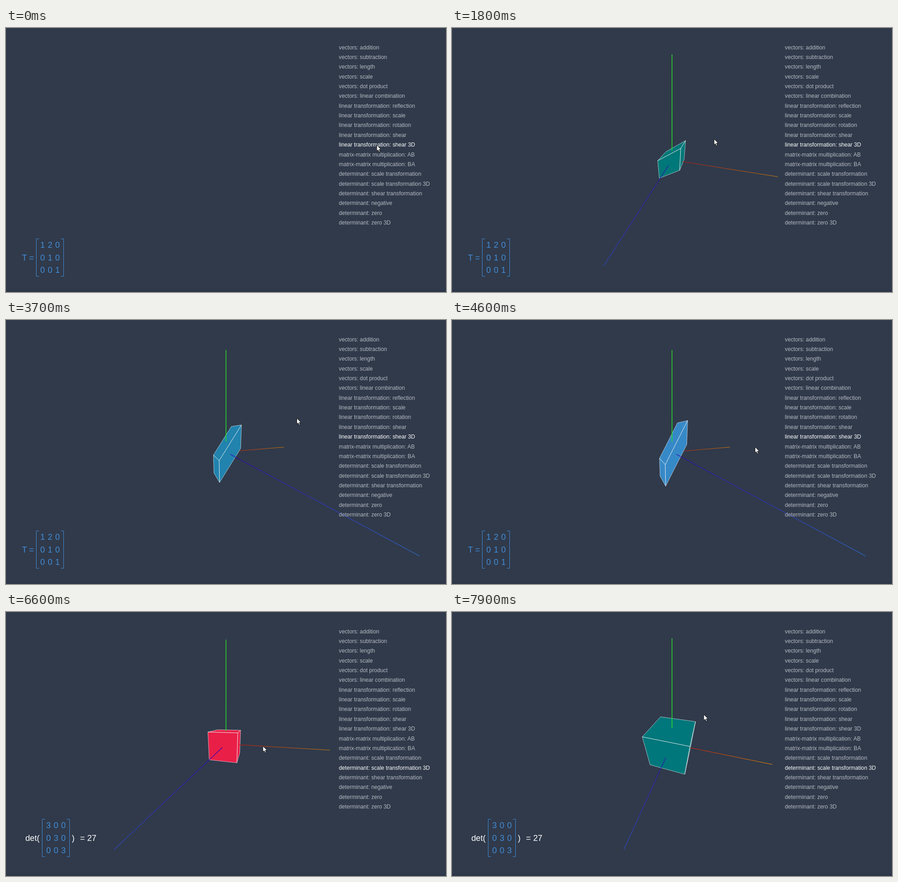
Write an HTML page with a canvas that moves like this. It is 966 by 579 pixels and loops after 8 s.

```html
<!DOCTYPE html>
<html lang="en">
<head>
<meta charset="utf-8">
<title>Linear transformations</title>
<style>
  html, body { margin: 0; width: 100%; height: 100%; overflow: hidden; background: #303a4b; }
  canvas { position: absolute; left: 58px; top: 58px; }
  svg { position: absolute; left: 0; top: 0; font-family: "Liberation Sans", Arial, sans-serif; }
  #menu { font-size: 12.2px; }
  .matrix { font-size: 18.2px; fill: #428cd6; }
  .matrix path { fill: none; stroke: #428cd6; }
  .matrix .plain { fill: #fff; }
  #arrow, #hand { fill: #fff; stroke: #111; stroke-width: 1; stroke-linejoin: round; }
</style>
</head>
<body>
<canvas id="scene" width="850" height="463"></canvas>
<svg width="966" height="579" viewBox="0 0 966 579">
  <rect y="574" width="966" height="5" fill="#2d3749"/>
  <g id="menu"></g>
  <g id="shear" class="matrix"><text x="35" y="510">T =</text></g>
  <g id="det" class="matrix">
    <text class="plain" x="42.5" y="502">det(</text>
    <text class="plain" x="144.5" y="502">)</text>
    <text class="plain" x="162.5" y="502">= 27</text>
  </g>
  <path id="arrow" d="M0 0V13L3 10.3L5 15L7.2 14L5.2 9.5H9.3Z"/>
  <path id="hand" d="M0 0Q1.5-1 2.5 .5V5L7.5 6.2Q9.2 6.8 9 8.6L8.6 13H1.5L-3.2 7.6Q-3.2 5.8-1.4 6.5L0 7.6Z"/>
</svg>
<script>
const LOOP = 8000, STEP = 100, SWITCH = 6000, TWEEN = 5130;
const FOCAL = 194.3, DIST = Math.hypot(4, 4, 16), AXIS = 16, HALF = 2;
const TURN = 2 * Math.PI / 579;
const SHEAR_ITEM = 10, DET_ITEM = 14;

const group = (title, names) => names.map(s => title + ': ' + s);
const items = [
  ...group('vectors', ['addition', 'subtraction', 'length', 'scale', 'dot product', 'linear combination']),
  ...group('linear transformation', ['reflection', 'scale', 'rotation', 'shear', 'shear 3D']),
  ...group('matrix-matrix multiplication', ['AB', 'BA']),
  ...group('determinant', ['scale transformation', 'scale transformation 3D', 'shear transformation',
    'negative', 'zero', 'zero 3D'])
];

const $ = id => document.getElementById(id);
const mix = (a, b, k) => a.map((v, i) => v + (b[i] - v) * k);
const rgb = c => `rgb(${c.map(Math.round)})`;
const unit = v => Math.min(1, Math.max(0, v));

const linear = k => k, slowStart = k => k * k, lateStart = k => k ** 3;
const smooth = k => k * k * (3 - 2 * k);

// Pointer strokes; a drag also turns the camera, a bow bends the path.
const strokes = [
  { from: 0, to: 1000, end: [581.2, 217.5], ease: smooth },
  { from: 1000, to: 1200, end: [578, 218.4], ease: linear, drag: true },
  { from: 1200, to: 2500, end: [631.2, 229], ease: lateStart, bow: [-8, 24], drag: true },
  { from: 2500, to: 2900, end: [638.5, 215.3], ease: linear, drag: true },
  { from: 3700, to: 5600, end: [758, 341], ease: slowStart, bow: [0, 35] },
  { from: 6000, to: 6600, end: [564, 294], ease: smooth },
  { from: 6600, to: 7300, end: [557.5, 179.2], ease: smooth },
  { from: 7500, to: 7900, end: [552.8, 224.7], ease: linear, drag: true }
];

// Pointer position and the drag distance since the current scene opened.
function pointerAt(t) {
  let pos = [814, 257], drag = [0, 0];
  for (const { from, to, end, ease, bow = [0, 0], drag: turns } of strokes) {
    if (t < from) break;
    if (from === SWITCH) drag = [0, 0];
    const k = unit((t - from) / (to - from)), bend = Math.sin(Math.PI * k);
    const next = mix(pos, end, ease(k)).map((v, i) => v + bow[i] * bend);
    if (turns) drag = drag.map((v, i) => v + next[i] - pos[i]);
    pos = next;
  }
  return { pos, drag };
}

function add(parent, tag, attrs, text = '') {
  const el = document.createElementNS('http://www.w3.org/2000/svg', tag);
  for (const k in attrs) el.setAttribute(k, attrs[k]);
  el.textContent = text;
  parent.append(el);
  return el;
}

function drawMatrix(parent, x, base, rows) {
  add(parent, 'path', { d: `M${x + 6} ${base - 47.5}h-6v82h6M${x + 54} ${base - 47.5}h6v82h-6` });
  rows.forEach((row, r) => [...row].forEach((n, c) => add(parent, 'text', {
    x: x + 13.9 + c * 16.3, y: Math.floor(base + (r - 1) * 27.5), 'text-anchor': 'middle'
  }, n)));
}

const labels = items.map((s, i) => add($('menu'), 'text', { x: 730.8, y: Math.round(46.6 + i * 21.36) }, s));
drawMatrix($('shear'), 66.5, 510, ['120', '010', '001']);
drawMatrix($('det'), 79.5, 502, ['300', '030', '003']);

const ctx = $('scene').getContext('2d');

function camera([dx, dy]) {
  const theta = Math.atan2(4, 16) - dx * TURN, phi = Math.asin(4 / DIST) + dy * TURN;
  const st = Math.sin(theta), ct = Math.cos(theta), sp = Math.sin(phi), cp = Math.cos(phi);
  return ([x, y, z]) => {
    const k = FOCAL / (DIST - x * st * cp - y * sp - z * ct * cp);
    return [425 + k * (x * ct - z * st), 231.5 - k * (y * cp - x * st * sp - z * ct * sp)];
  };
}

function line(a, b, style, width) {
  ctx.strokeStyle = style;
  ctx.lineWidth = width;
  ctx.beginPath();
  ctx.moveTo(...a);
  ctx.lineTo(...b);
  ctx.stroke();
}

const axisColors = [['#b40f14', '#c87d0f'], ['#1edc2d', '#2dcd23'], ['#3200b4', '#2d78dc']];

function drawAxis(project, n, from) {
  const at = v => project([0, 1, 2].map(i => i === n ? v : 0));
  const tip = at(AXIS), paint = ctx.createLinearGradient(...at(0), ...tip);
  axisColors[n].forEach((c, i) => paint.addColorStop(i, c));
  line(at(from), tip, paint, n === 1 ? 1.6 : 1.1);
}

function cubeFaces(project, half, shear) {
  const faces = [];
  for (let n = 0; n < 3; n++) for (const side of [1, -1]) {
    const quad = [[-1, -1], [1, -1], [1, 1], [-1, 1]].map(([u, v]) => {
      const p = [];
      p[n] = side;
      p[(n + 1) % 3] = u * side;
      p[(n + 2) % 3] = v;
      return p;
    });
    const pts = quad.map(([x, y, z]) => project([x * half, (y + shear * x) * half, z * half]));
    const area = pts.reduce((s, p, i) => {
      const q = pts[(i + 1) % 4];
      return s + p[0] * q[1] - q[0] * p[1];
    }, 0);
    faces.push({ n, side, quad, pts, visible: area < 0 });
  }
  return faces;
}

function drawCube(faces, color) {
  const edges = new Map();
  ctx.fillStyle = color;
  for (const { quad, pts } of faces.filter(f => f.visible)) {
    ctx.beginPath();
    pts.forEach(p => ctx.lineTo(...p));
    ctx.closePath();
    ctx.fill();
    pts.forEach((p, i) => {
      const j = (i + 1) % 4, key = [quad[i], quad[j]].map(String).sort().join('|');
      const edge = edges.get(key) || { a: p, b: pts[j], count: 0 };
      edge.count++;
      edges.set(key, edge);
    });
  }
  for (const { a, b, count } of edges.values())
    line(a, b, `rgba(255,255,255,${count > 1 ? .9 : .6})`, 1);
}

const cubeColor = p => rgb(p < .3
  ? mix([229, 23, 56], [259, 90, 196], p)
  : mix([-54, 107, 69], [66, 140, 214], p));

function drawScene(local, second, drag) {
  ctx.clearRect(0, 0, 850, 463);
  if (local < STEP) return;
  const progress = unit(local / TWEEN);
  const shear = second ? 0 : 2 * progress;
  const half = HALF * (second ? 1 + 2 * progress : 1);
  const project = camera(drag);
  const faces = cubeFaces(project, half, shear);
  const axes = faces.filter(f => f.side > 0);
  const axis = f => drawAxis(project, f.n, f.n === 0 ? half / Math.max(1, shear) : half);
  axes.filter(f => !f.visible).forEach(axis);
  drawCube(faces, cubeColor(progress));
  axes.filter(f => f.visible).forEach(axis);
}

function render(time) {
  const t = Math.floor(time % LOOP / STEP) * STEP;
  const second = t >= SWITCH;
  const { pos, drag } = pointerAt(t);
  drawScene(second ? t - SWITCH : t, second, drag);

  $('shear').style.display = second ? 'none' : '';
  $('det').style.display = second ? '' : 'none';
  const glow = second ? 1 : unit((t - 5200) / 400);
  labels.forEach((el, i) => {
    const on = i === DET_ITEM ? glow : i === SHEAR_ITEM && !second ? 1 : 0;
    el.style.fill = rgb(mix([182, 186, 193], [255, 255, 255], on));
  });

  const hover = glow > 0 && !second;
  for (const [id, on] of [['arrow', !hover], ['hand', hover]]) {
    $(id).style.display = on ? '' : 'none';
    $(id).setAttribute('transform', `translate(${pos})`);
  }
}

const begin = performance.now();
function tick() {
  render(performance.now() - begin);
  requestAnimationFrame(tick);
}
tick();
</script>
</body>
</html>
```
